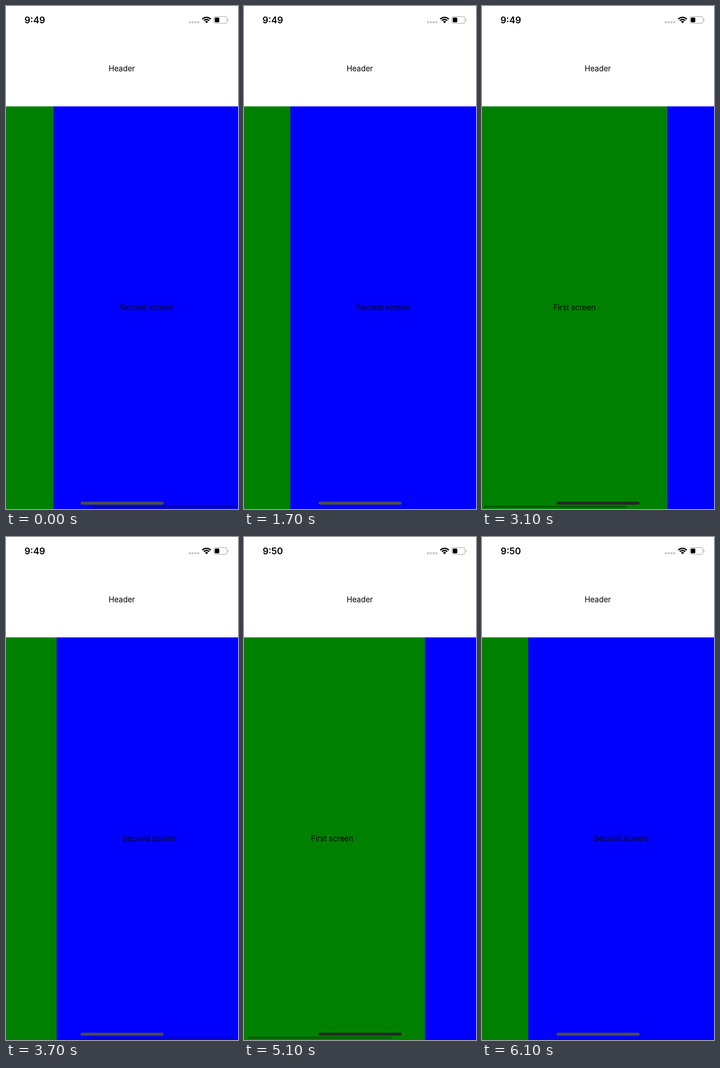
An HTML page that plays this animation: 509 px wide and 1101 px high, repeating every 6.2 s.

```html
<!DOCTYPE html>
<html lang="en">
<head>
<meta charset="utf-8">
<style>
  html, body { margin: 0; width: 100%; height: 100%; overflow: hidden; background: #fff; }
  svg { display: block; }
  text { font: 16.65px Inter, sans-serif; text-anchor: middle; }
  #clock { font-size: 20px; font-weight: 600; }
</style>
</head>
<body>
<svg width="509" height="1101" viewBox="0 0 509 1101">
  <!-- status bar -->
  <text id="clock" x="63.2" y="37.6">9:49</text>
  <path d="M403.5 35.4h18.6" stroke="#c8c8c8" stroke-width="5" stroke-linecap="round" stroke-dasharray="0 6.15"/>
  <g fill="none" stroke="#000" stroke-width="2.8">
    <path d="M430.7 28.8A12.9 12.9 0 0 1 449.3 28.8M434.1 32A8.2 8.2 0 0 1 445.9 32"/>
    <path d="M440 37.7L436.6 34.3A4.7 4.7 0 0 1 443.4 34.3z" fill="#000" stroke="none"/>
  </g>
  <rect x="456" y="23.2" width="29" height="14.6" rx="4.3" fill="none" stroke="#a6a6a6" stroke-width="1.2"/>
  <rect x="458" y="25.2" width="10" height="10.6" rx="2.2"/>
  <path d="M486.6 28.2q1.7.7 1.7 2.3t-1.7 2.3z" fill="#a6a6a6"/>

  <text x="254" y="143">Header</text>

  <!-- two pages, each 80% of the width -->
  <g id="pages">
    <rect x="-10" y="219.7" width="418" height="882" fill="#008000"/>
    <rect x="407.1" y="219.7" width="408" height="882" fill="#00f"/>
    <text x="203.3" y="666">First screen</text>
    <text x="610.3" y="666">Second screen</text>
  </g>
  <rect id="home" x="163.7" y="1085" width="182" height="6.4" rx="3.2"/>
  <rect id="bar" x="3.8" y="1094" width="314" height="3.8" rx="1.9"/>
</svg>
<script>
  const LOOP = 6200, STEP = 100, TRAVEL = 305.7;
  // Swipes alternate backward and forward: [start, time after start when the scroll bar is gone]
  const swipes = [[0, 580], [1000, 620], [2660, 580], [3400, 620], [4800, 840], [5500, 620]];
  const [clock, pages, home, bar] = ['clock', 'pages', 'home', 'bar'].map(id => document.getElementById(id));
  const clamp = v => Math.max(0, Math.min(1, v));
  const swipeEase = ms => 1 / (1 + Math.exp(-0.02668 * (ms - 173)));

  function draw(now) {
    const t = Math.floor(now % LOOP / STEP) * STEP;
    const index = swipes.findLastIndex(([start]) => start <= t);
    const [start, gone] = swipes[index];
    const age = t - start;
    const eased = swipeEase(age);
    const p = index % 2 ? eased : 1 - eased;

    pages.setAttribute('transform', `translate(${-p * TRAVEL})`);
    bar.setAttribute('transform', `translate(${p * 188})`);
    bar.setAttribute('fill-opacity', 0.35 * clamp((gone - age) / 150));
    const grey = Math.round(39 + 38 * p);
    home.setAttribute('fill', `rgb(${grey},${grey},${grey})`);
    clock.textContent = t < 5000 ? '9:49' : '9:50';
  }

  function tick() {
    draw(performance.now());
    requestAnimationFrame(tick);
  }
  tick();
</script>
</body>
</html>
```
